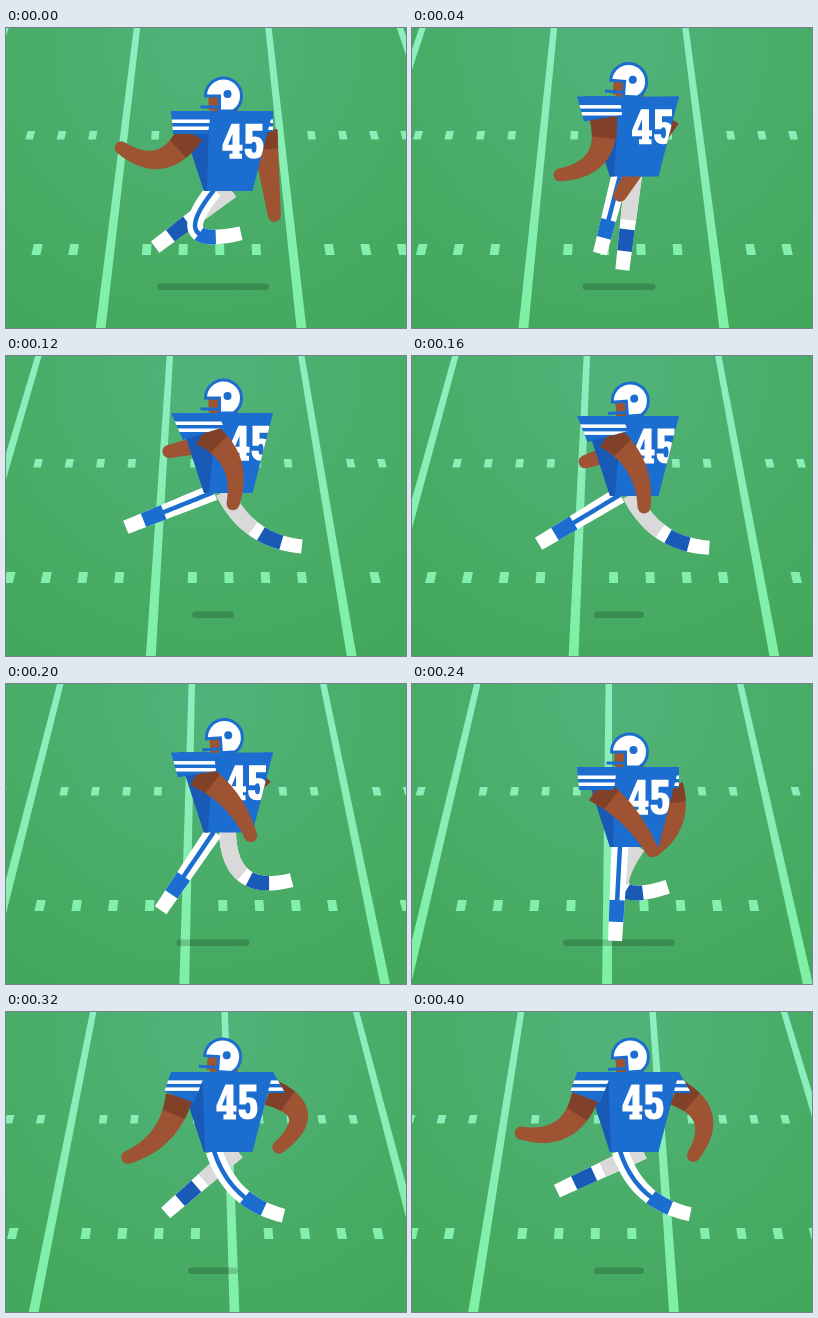
An HTML page with a canvas that plays this animation: 400 by 300 pixels, repeating every 0.48 s.

```html
<!DOCTYPE html>
<html lang="en">
<head>
<meta charset="utf-8">
<title>Running player</title>
<style>
  html, body { margin: 0; width: 100%; height: 100%; overflow: hidden; background: #49ae65; }
  canvas { display: block; width: 400px; height: 300px; }
</style>
</head>
<body>
<canvas id="stage" width="400" height="300" role="img" aria-label="Player number 45 running"></canvas>
<script>
const c = document.getElementById('stage').getContext('2d');
const STEP = 40, STEPS = 12, LAST = 10;
const BLUE = '#1c6dd0', NAVY = '#185ab5', SKIN = '#9e5333', SHADE = '#814128',
      WHITE = '#fff', GREY = '#d9d9d9';

// Swing in degrees from straight down (positive is backwards), one key every second step.
const swing = {
  nearLeg: [32, -59, -59, -3, 47, 48],
  farLeg: [-53, 40, 56, 37, -49, -65],
  nearArm: [-78, 9, 27, 42, -40, -60],
  farArm: [7, -68, -72, -14, 10, 16]
};

const four = new Path2D('M9 0H17V21H20V27H17V30H19.5V35H7V30H10V27H0V21ZM10 10V21H5.5Z');
const five = new Path2D('M1 0H18V7H8V13Q19 11 19 23.5Q19 35 9.5 35Q0 35 0 25H7Q7 29 9.5 29Q12 29 12 23.5Q12 18 9.5 18Q7.5 18 7 20H1Z');

function fade(gradient, from, to) {
  gradient.addColorStop(0, from);
  gradient.addColorStop(1, to);
  return gradient;
}
const grass = fade(c.createRadialGradient(200, 20, 0, 200, 20, 320), '#51b37a', '#43a85b');
const chalk = fade(c.createLinearGradient(0, 0, 0, 300), '#8fedc0', '#7ff0a6');

const mix = (a, b, t) => a + (b - a) * t;

// Smooth closed curve through evenly spaced keys.
function spline(keys, x) {
  const i = Math.floor(x), t = x - i, n = keys.length;
  const [p, a, b, q] = [-1, 0, 1, 2].map(d => keys[(i + d + n) % n]);
  return a + t / 2 * (b - p + t * (2 * p - 5 * a + 4 * b - q + t * (3 * (a - b) + q - p)));
}

function poly(pts, color) {
  c.beginPath();
  pts.forEach(p => c.lineTo(...p));
  c.closePath();
  if (color) {
    c.fillStyle = color;
    c.fill();
  }
}

// A limb of two equal bones from a joint, as a quadratic curve; side picks where it bends.
function bones([x, y], degrees, reach, bone, side) {
  const a = degrees * Math.PI / 180, dx = Math.sin(a), dy = Math.cos(a);
  const bend = side * 1.7 * Math.sqrt(Math.max(0, bone ** 2 - reach ** 2 / 4));
  return [
    [x, y],
    [x + dx * reach / 2 + dy * bend, y + dy * reach / 2 - dx * bend],
    [x + dx * reach, y + dy * reach]
  ];
}

// Fills the part a..b of a limb whose width tapers from w0 to w1.
function band([p, q, r], a, b, w0, w1, color) {
  const left = [], right = [], n = 18;
  for (let i = 0; i <= n; i++) {
    const t = mix(a, b, i / n);
    const [x, y] = [0, 1].map(j => mix(mix(p[j], q[j], t), mix(q[j], r[j], t), t));
    const [dx, dy] = [0, 1].map(j => mix(q[j] - p[j], r[j] - q[j], t));
    const h = mix(w0, w1, t) / 2 / Math.hypot(dx, dy);
    left.push([x - dy * h, y + dx * h]);
    right.unshift([x + dy * h, y - dx * h]);
  }
  poly(left.concat(right), color);
}

function arm(pts) {
  band(pts, 0, 1, 27, 13, SKIN);
  c.beginPath();
  c.arc(...pts[2], 6.5, 0, 7);
  c.fill();
  band(pts, 0, .22, 27, 13, SHADE);
}

// The leg tucks up briefly as it leaves the ground; only a trailing leg bends.
function leg(hip, degrees, phase, near) {
  const tuck = ((1 + Math.cos(phase)) / 2) ** 16;
  const pts = bones(hip, degrees, 95 - 44 * tuck, 50, degrees > 0 ? -1 : 0);
  band(pts, 0, 1, 17, 14, WHITE);
  if (near) band(pts, 0, .6, 4.5, 4.5, BLUE);
  else band(pts, 0, .47, 17, 14, GREY);
  band(pts, .57, .8, 17, 14, near ? BLUE : NAVY);
}

function sleeve(pts, top) {
  poly(pts, BLUE);
  c.save();
  c.clip();
  c.fillStyle = WHITE;
  c.fillRect(150, top + 8.5, 140, 3.5);
  c.fillRect(150, top + 15.5, 140, 3.5);
  c.restore();
}

function field(k) {
  c.fillStyle = grass;
  c.fillRect(0, 0, 400, 300);
  const gap = 131.5, at = (x, y) => [200 + (x - 200) * (1 + .527 * y / 300), y];
  const mark = (x, y0, y1) =>
    poly([at(x - 3.2, y0), at(x + 3.2, y0), at(x + 3.2, y1), at(x - 3.2, y1)], chalk);
  for (let n = -2; n < 3; n++) {
    const x = 131 + gap * (n + k / STEPS);
    mark(x, 0, 300);
    for (let j = 1; j < 5; j++) {
      mark(x + gap * j / 5, 103, 111.5);
      mark(x + gap * j / 5, 216, 227);
    }
  }
}

function head(k, top) {
  const tilt = Math.sin(Math.PI * k / 3);
  c.save();
  c.fillStyle = SKIN;
  c.fillRect(204, top - 4, 28, 4);
  c.translate(217.5 - tilt, top - 15);
  c.rotate(tilt * .08);
  c.fillRect(-15, 0, 11, 14);
  c.beginPath();
  c.arc(0, 0, 18, Math.PI, .97);
  c.lineTo(-4, 15);
  c.lineTo(-4, 0);
  c.closePath();
  c.fillStyle = WHITE;
  c.fill();
  c.strokeStyle = BLUE;
  c.lineWidth = 3;
  c.stroke();
  c.beginPath();
  c.moveTo(-23, 11);
  c.lineTo(-4, 11);
  c.stroke();
  c.fillStyle = BLUE;
  c.beginPath();
  c.arc(4, -2, 4, 0, 7);
  c.fill();
  c.restore();
}

function draw(k) {
  const phase = 2 * Math.PI * k / STEPS, s = Math.sin(phase), co = Math.cos(phase);
  const u = k % 6 / 6, lift = 4 * u * (1 - u);
  const top = 83 - 26 * lift, hem = top + 80;
  const at = (x, y) => [x, top + y];
  const angle = name => spline(swing[name], k / 2);

  field(k);
  const half = 56 - 35 * lift;
  c.fillStyle = 'rgba(0, 0, 0, .18)';
  c.beginPath();
  c.roundRect(207 - half, 255.5, half * 2, 6.5, 3.25);
  c.fill();

  leg([225 - 7 * s, hem - 1], angle('farLeg'), phase + Math.PI, false);
  leg([208, hem - 1], angle('nearLeg'), phase, true);
  arm(bones(at(258 - 6 * s, 20), angle('farArm'), 75 + 10 * co + 16 * s, 35 - 6 * s, 1));
  sleeve([at(257, 0), at(267, 0), at(267 - 14 * s, 21), at(257, 21)], top);

  const torso = [at(172, 0), at(267, 0), at(246.5, 80), at(198, 80)];
  poly(torso, BLUE);
  poly([at(172, 0), at(203 + 8 * s, 0), at(201 + 2 * s, 80), at(198, 80)], NAVY);
  c.save();
  poly(torso);
  c.clip();
  c.translate(216.5 + 7 * s, top + 12.7);
  c.fillStyle = WHITE;
  c.fill(four, 'evenodd');
  c.translate(22, 0);
  c.fill(five);
  c.restore();

  const front = at(167 + 10 * s, 23 + 4 * s), back = at(202 + 16 * s, 23 - 9 * s);
  const shoulder = [(front[0] + back[0]) / 2, (front[1] + back[1]) / 2 - 1];
  arm(bones(shoulder, angle('nearArm'), 77 - 6 * co, 42, 1));
  sleeve([at(165, 0), at(205 + 6 * s, 0), back, front], top);
  head(k, top);
}

let shown = -1;
function tick() {
  const k = Math.min(LAST, Math.floor(performance.now() % (STEP * STEPS) / STEP));
  if (k !== shown) draw(shown = k);
  requestAnimationFrame(tick);
}
tick();
</script>
</body>
</html>
```
